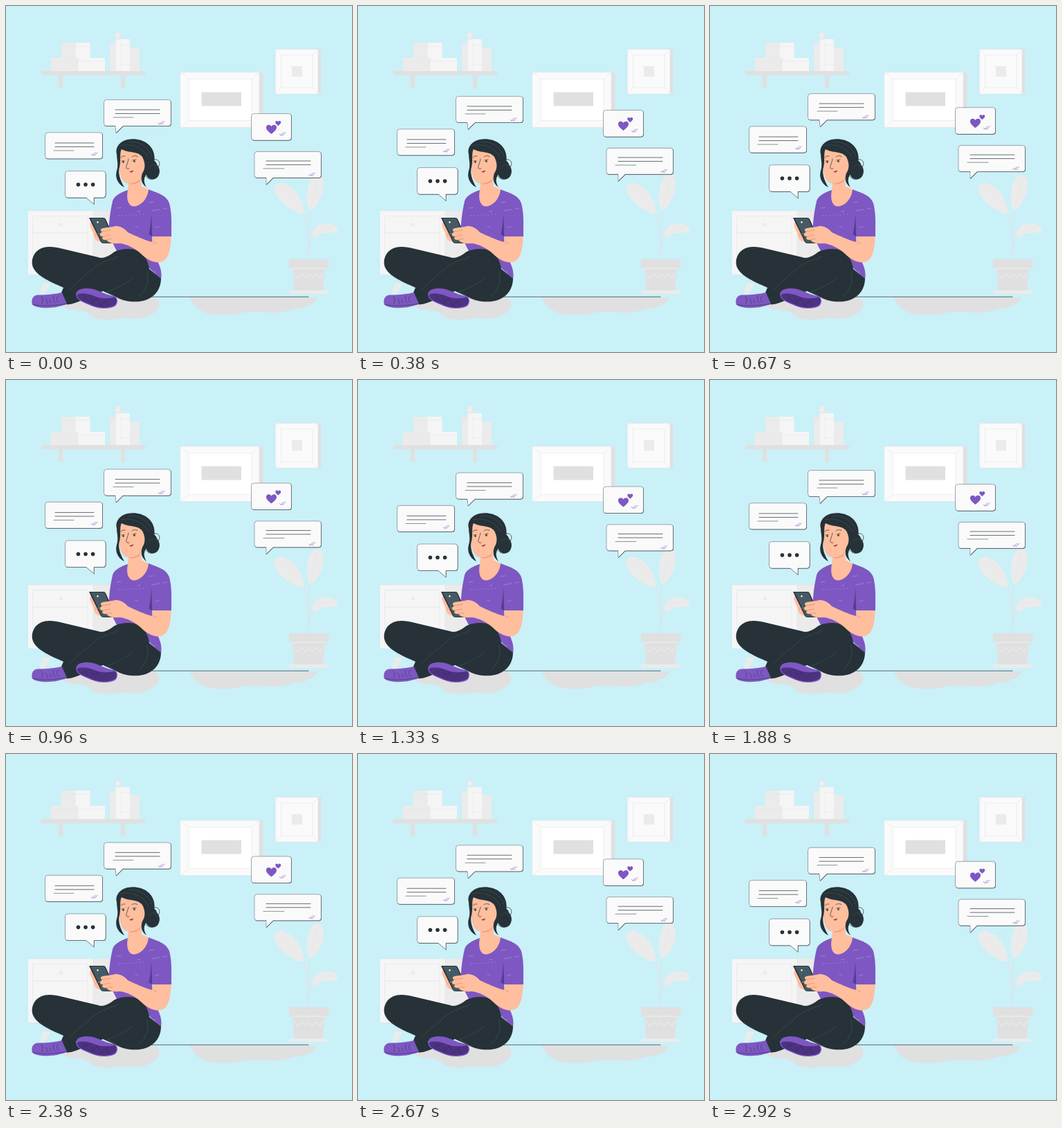
An HTML page for the animation above (2960 ms loop, 500x500 px).

```html
<!DOCTYPE html>
<html lang="en">
<head>
<meta charset="utf-8">
<title>Chatting at home</title>
<style>
html, body { margin: 0; width: 100%; height: 100%; overflow: hidden; background: #caf0f8; }
svg { display: block; width: 100vw; height: 100vh; }
.a { fill: #fafafa } .b { fill: #f5f5f5 } .c { fill: #ebebeb } .d { fill: #e0e0e0 }
.ink { fill: #263238 } .skin { fill: #ffbe9d } .violet { fill: #7e57c2 }
.thin, .pale, .crease, .dash, .tick { fill: none; stroke-linecap: round; stroke-linejoin: round; }
.thin { stroke: #263238; stroke-width: .7 }
.pale { stroke: #e4e4e4; stroke-width: .6 }
.crease { stroke: #4b5a62; stroke-width: .5 }
.dash { stroke: #b79fe0; stroke-width: .6 }
.bubble { fill: #fafafa; stroke: #263238; stroke-width: .4 }
.tick { stroke: #7e57c2; stroke-width: .7 }
</style>
</head>
<body>
<svg viewBox="0 0 500 500">
  <!-- floor -->
  <path class="d" d="M82 432C86 441 101 438 112 441C124 444 121 452 140 453C157 455 165 450 180 452C196 454 207 448 213 444C222 440 223 428 219 423L205 419H100Z"/>
  <path class="d" d="M264 421H450C446 430 436 436 422 437C412 437 405 443 390 443C370 443 355 440 338 444C318 449 292 447 280 439C271 434 270 427 264 421Z"/>
  <path class="thin" d="M205 420.300H437"/>

  <!-- shelf -->
  <path class="d" d="M51 94H201V100H172V119H166V100H82V119H76V100H51Z"/>
  <path class="c" d="M65 75H104V94H65ZM80 53H100V75H80ZM150 54H158V94H150Z"/>
  <path class="b" d="M104 75H143V94H104ZM100 53H121.500V75H100ZM165 48H179V94H165Z"/>
  <path class="c" d="M158 38H165.500V94H158ZM179 60H193V94H179Z"/>
  <path class="b" d="M159 48H165V94H159Z"/>
  <path class="pale" d="M65 80H143M80 58H121M104 75V94M100 53V75M165 56H179M165 84H179M158 48H165M150 60H158"/>
  <circle class="b" cx="161.500" cy="43" r="1.500"/>

  <!-- pictures -->
  <path class="d" d="M366 96H371.500V175.500H366ZM451 62.500H455.500V127H451Z"/>
  <path class="a" d="M252 96H366V175.500H252ZM389.500 62.500H451V127H389.500Z"/>
  <path fill="#fff" d="M264.500 106H355V165.500H264.500Z"/>
  <path class="pale" d="M252 96H366V175.500H252ZM264.500 106H355V165.500H264.500ZM252 96L264.500 106M366 96L355 106M252 175.500L264.500 165.500M366 175.500L355 165.500M389.500 62.500H451V127H389.500ZM398 71H443V118H398ZM389.500 62.500L398 71M451 62.500L443 71M389.500 127L398 118M451 127L443 118"/>
  <path class="d" d="M282.500 124.500H340V144.500H282.500Z"/>
  <path class="c" d="M413 87H428V102H413Z"/>

  <!-- plant -->
  <g class="c">
    <path d="M431 300C417 300 394 285 388 268C385 256 398 252 409 260C423 268 430 285 431 300Z"/>
    <path d="M439 296C432 282 434 258 443 247C449 240 458 246 459 255C460 272 451 290 439 296Z"/>
    <path d="M442 333C442 321 452 313 463 314C473 314 481 319 479 325C474 330 462 326 454 330C450 334 446 336 442 333Z"/>
    <path d="M409 411H465V416H409Z"/>
  </g>
  <path fill="none" stroke="#e2e2e2" d="M436.500 366C437 340 438 315 439 295M431 300C434 315 438 335 436.500 366M442 333C438 340 437 350 436.500 366"/>
  <path class="pale" d="M398 264C414 274 425 286 431 300M449 252C446 270 442 284 439 295M475 321C462 318 449 323 442 333"/>
  <path class="d" d="M409 366H466V379H461L458 411H417L414 379H409Z"/>
  <path fill="none" stroke="#f2f2f2" stroke-width=".8" d="M417 386L422 393L428 387L433 393L438 387L443 393L449 387L454 393L459 386M414 379H461"/>

  <!-- drawers -->
  <path class="c" d="M53 401H65L55 417H49Z"/>
  <path class="c" d="M125 296H166V388H125Z"/>
  <path class="b" d="M32 296H126V388H32Z"/>
  <path class="pale" d="M39 303.500H118V328H39ZM39 328H118V380H39ZM126 296V388M32 296H160"/>
  <circle class="c" cx="79" cy="316" r="2.500"/>

  <!-- torso -->
  <path class="violet" d="M176 266C164 270 156 275 154 282C150 300 148 316 149 332L160 354L198 370L224 395C227 382 219 368 214 360L211 333H239C239 315 240 300 236 285C232 273 218 270 206 265Z"/>
  <path fill="#5c3b99" d="M210 306C209 316 208 324 206 330L211 333Z"/>
  <path class="skin" d="M178 248L176 266C173 281 178 289 184 289.500C194 290 205 279 206 265L196 261L195 245Z"/>
  <path fill="#f29b77" d="M178 255C185 257 191 254 195 249L193 253C188 258 183 258 178 257Z"/>
  <path class="dash" d="M160 292L166 291.500M190 297H194M207 284L213 283M211 296L222 294M227 293L232 292.500M187 319H191M216 320L221 319M203 375L206 377M213 383L216 385"/>
  <path class="dash" stroke-dasharray="1 4" d="M163 303L200 301"/>
  <path class="thin" stroke-opacity=".5" d="M210 304C209 315 210 325 211 333"/>

  <!-- legs -->
  <path class="ink" d="M64 348C47 347 36 359 38 374C41 389 63 398 83 407L80 414L88 431.500C96 431 104 428 112 424L140 412L160 421C172 428 190 429 202 425C216 420 224 408 224 394L207 380C205 367 200 359 192 354C183 350 168 350 157 355C149 361 141 366 133 363L76 349.500C72 348.500 68 348 64 348Z"/>
  <path class="crease" d="M92 410C105 396 120 385 133 374C142 369 153 366 162 362M146 413C158 409 170 403 182 394M146 413L157 418M204 384C207 397 203 409 194 418M81 414L88 431"/>
  <path class="violet" d="M80.500 414C71 416.500 56 418 46 417.500C39 418 36 424 38 431C42 437 62 437 73 435C80 433 85 432 88 431Z"/>
  <path class="thin" stroke-opacity=".7" d="M38 431C50 434.500 65 433.500 88 430M51 420C54 422 53 426 52 430M58 424L60 430M63 425L65 429M69 419.500C67 424 70 428 71 429M76 419C72 421 73 426 76 428"/>
  <path class="violet" d="M101 416C103 408 115 407 126 409C137 412 145 418 157 419C163 423 162 433 155 435C143 439 130 437 118 431C108 427 101 424 101 416Z"/>
  <path fill="#4d3182" d="M103 417C110 414 121 416 130 420C140 424 150 422 158 421C162 426 159 433 153 434C142 437 130 436 119 430C109 426 102 423 103 417Z"/>
  <path class="thin" stroke-opacity=".45" d="M112 417L119 429M120 418L129 433M130 421L140 435M143 423L148 434M109 424L122 418M121 430L134 422M135 434L148 423"/>

  <!-- phone and arms -->
  <path class="skin" d="M122 312C119 318 126 325 127 332C128 340 137 342 143 340L138 320Z"/>
  <path class="ink" d="M120 306H141Q143 306 144 308L160 343H141Q138 343 137 341Z"/>
  <path fill="#455a64" d="M122.500 307H142L158 342.300H139Z"/>
  <circle fill="#fff" cx="132.500" cy="312.500" r="1.200"/>
  <path class="skin" d="M212 333L211 341C199 338 187 332 176 327C170 320 162 316 154 319L140 321C136 322 136 325 139 326L136 329C135 332 138 333 140 333L139 336C140 338 143 338 145 338C149 343 157 344 164 343C175 344 186 350 195 358C204 367 214 372 224 370C235 367 238 352 238.500 333Z"/>
  <path fill="none" stroke="#d9815f" stroke-width=".6" d="M139 326L152 324M140 333L151 331M145 338L154 336M129 331L136 329M212 340C214 342 216 343 218 343"/>

  <!-- head -->
  <path class="ink" d="M205 226C208 221 217 222 218 229C224 235 223 246 216 249.500C209 252 203 248 202 242Z"/>
  <path class="thin" d="M212 222C220 220 225 226 220 233M202 246C207 252 213 252 219 247"/>
  <path class="skin" d="M163 211C163 226 163 243 168 251C174 260 187 257 195 249L203 239C206 232 204 225 201 217L190 204H170Z"/>
  <path class="ink" d="M160 214C157 203 167 193 180 192.500C197 191 211 200 214 214C216 225 213 235 206 241C200 245 197 252 203 262C194 256 194 246 199 238C202 231 200 224 197 218C190 209 178 213 167 207C164 212 166 222 164.500 231C161 241 165 252 171 262C162 258 157 248 160 238C163 229 160 222 160 214Z"/>
  <path class="crease" d="M166 202C182 198 199 205 206 220M178 196C193 196 205 203 211 217M206 234C211 228 216 228 219 235"/>
  <path class="thin" d="M166 219C168 216.800 170 216.500 172 217M182 218C184 216 187 216 190 217.500M177 221C176 227 173 232 174 234C175 235.500 177 235.500 178 235M167 224L171 223.500M183 223L188 222"/>
  <path fill="#8c3038" d="M178 238.500C180 239.500 182.500 238.500 184 237C184 239.500 182 241 180 240.500Z"/>
  <circle class="ink" cx="169.500" cy="225.500" r="1.300"/>
  <circle class="ink" cx="185.500" cy="224.500" r="1.300"/>

  <g id="chat"></g>
</svg>
<script>
const chat = document.getElementById('chat');

// Rounded bubble; tail = [left root, tip x, right root, drop]
function bubble(x, y, w, h, tail) {
  const b = y + h, r = 4;
  const tip = tail ? `H${tail[2]}L${tail[1]} ${b + tail[3]}L${tail[0]} ${b}` : '';
  const d = `M${x + r} ${y}h${w - 2 * r}q${r} 0 ${r} ${r}V${b - r}q0 ${r} ${-r} ${r}${tip}H${x + r}q${-r} 0 ${-r} ${-r}V${y + r}q0 ${-r} ${r} ${-r}z`;
  return `<path class="ink" d="${d}" transform="translate(.4 .5)"/><path class="bubble" d="${d}"/>`;
}
const lines = (x, y, w, short, indent) =>
  `<path class="thin" d="M${x} ${y}h${w}M${x} ${y + 5.5}h${w}"/>` +
  `<path class="thin" stroke-opacity=".75" d="M${x - indent} ${y + 11}h${short}"/>`;
const ticks = (x, y) =>
  `<path class="tick" d="M${x} ${y}l1.500 2l4 -4.500M${x + 3.5} ${y + 1}l1 1l4 -4.500"/>`;
const heart = (x, y, s) =>
  `<path class="violet" transform="translate(${x} ${y}) scale(${s})" d="M0 7C-5 3 -8 0 -7.500 -3C-7 -7 -2 -7.500 0 -4C2 -7.500 7 -7 7.500 -3C8 0 5 3 0 7Z"/>`;

chat.innerHTML =
  bubble(141.5, 135.9, 97, 38, [158, 159, 169, 10]) + lines(158, 150.3, 64, 29, 3) + ticks(220.5, 169.5) +
  bubble(56.5, 183.2, 83, 38) + lines(71, 198.3, 56, 29, 2) + ticks(123.5, 214.5) +
  bubble(85.5, 238.9, 58.5, 38.5, [116, 127, 127, 9.5]) +
  [104.4, 115, 125.6].map(x => `<circle class="ink" cx="${x}" cy="258.3" r="2.800"/>`).join('') +
  bubble(354.5, 155.9, 58, 38.5) + heart(383.5, 178.4, 1) + heart(393.3, 169.8, .53) + ticks(395.5, 185.5) +
  bubble(359, 210.7, 96.5, 38, [376, 376, 386, 10]) + lines(376, 224.3, 64, 30, 4) + ticks(438, 244);

const LOOP = 2960, STEP = 1000 / 24, BOB = 1500, RISE = 10;
function draw(now) {
  const step = Math.min(70, Math.floor((now % LOOP + 5) / STEP));
  const phase = (step * STEP + 27) % BOB / BOB;
  const lift = RISE * (1 - Math.abs(1 - 2 * phase));
  chat.setAttribute('transform', `translate(0 ${-lift.toFixed(2)})`);
  requestAnimationFrame(draw);
}
draw(0);
</script>
</body>
</html>
```
